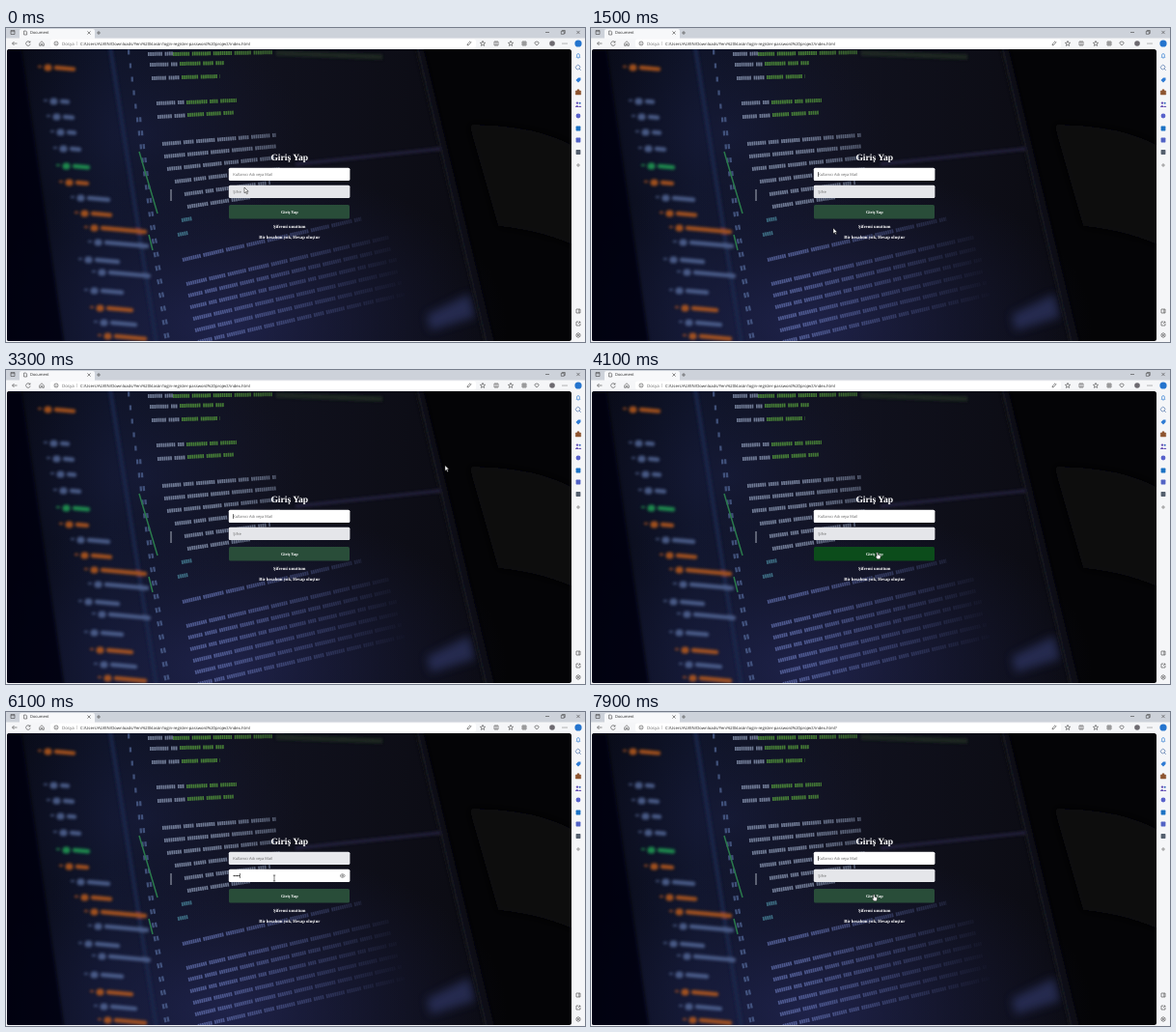
An HTML page that plays this animation: 600x325 px, repeating every 8000 ms.

```html
<!DOCTYPE html>
<html lang="tr">
<head>
<meta charset="utf-8">
<title>Giriş Yap</title>
<style>
  html, body { margin: 0; width: 100%; height: 100%; overflow: hidden; }
  svg { display: block; width: 100vw; height: 100vh; }
  text { font: 4px "Open Sans", "Noto Sans", sans-serif; text-rendering: geometricPrecision; }
  .serif { font-family: "Liberation Serif", "Noto Serif", serif; font-weight: bold; fill: #fff; text-anchor: middle; }
  .hint { fill: #666; }
  .icon { fill: none; stroke: #444; stroke-width: .6; }
</style>
</head>
<body>
<svg viewBox="0 0 600 325" preserveAspectRatio="none">
  <defs>
    <linearGradient id="screen" x1="0" y1="0" x2="1" y2="0">
      <stop offset="0" stop-color="#080a16"/>
      <stop offset=".22" stop-color="#0f1428"/>
      <stop offset=".5" stop-color="#11121f"/>
      <stop offset="1" stop-color="#0b0b12"/>
    </linearGradient>
    <radialGradient id="glow">
      <stop offset="0" stop-color="#262b60" stop-opacity=".65"/>
      <stop offset="1" stop-color="#1a1e46" stop-opacity="0"/>
    </radialGradient>
    <linearGradient id="fade" x1="0" y1="0" x2="1" y2="0">
      <stop offset=".36" stop-color="#fff"/>
      <stop offset=".7" stop-color="#fff" stop-opacity="0"/>
    </linearGradient>
    <mask id="focus" maskUnits="userSpaceOnUse" x="0" y="0" width="600" height="325">
      <rect width="600" height="325" fill="url(#fade)"/>
    </mask>
    <filter id="soft" x="-10%" y="-10%" width="120%" height="120%"><feGaussianBlur stdDeviation="1.4"/></filter>
    <filter id="wide" x="-30%" y="-30%" width="160%" height="160%"><feGaussianBlur stdDeviation="5"/></filter>
    <filter id="slight" x="-10%" y="-10%" width="120%" height="120%"><feGaussianBlur stdDeviation=".5"/></filter>
    <clipPath id="page"><rect x="1" y="22" width="585" height="302" rx="2.5"/></clipPath>
  </defs>

  <rect width="600" height="325" fill="#f5f6f8"/>
  <rect width="600" height="10.5" fill="#cdd2da"/>
  <path d="M14 11V3q0-2 2-2H90q2 0 2 2V11z" fill="#f7f8fa"/>
  <rect x="46" y="11.5" width="441" height="9" rx="2.5" fill="#fff"/>

  <g clip-path="url(#page)">
    <rect y="22" width="590" height="303" fill="#040406"/>
    <path d="M480 100Q560 100 600 130V230Q560 210 510 205z" fill="#09090c" filter="url(#wide)"/>
    <path d="M0 22H424L496 325H0z" fill="url(#screen)"/>
    <ellipse cx="230" cy="310" rx="290" ry="170" fill="url(#glow)"/>
    <ellipse cx="140" cy="110" rx="170" ry="120" fill="url(#glow)" opacity=".4"/>
    <path d="M436 297l44-22 6 24-46 14z" fill="#343c72" opacity=".6" filter="url(#wide)"/>
    <g filter="url(#soft)">
      <path d="M0 22H16L60 325H0z" fill="#05060c" opacity=".85"/>
      <path d="M424 20H432L506 327H496z" fill="#101016"/>
      <path d="M426 20L498 327" stroke="#1c1d29" stroke-width="1.2"/>
      <path d="M108 20L156 327" stroke="#1d2548" stroke-width="4"/>
      <path d="M300 141L450 125" stroke="#2d2a50" stroke-width="3" opacity=".7"/>
      <path d="M280 26L390 30" stroke="#243226" stroke-width="5" opacity=".7"/>
      <g id="tree" fill="none" stroke-linecap="round"></g>
    </g>
    <g id="code" fill="none" filter="url(#slight)" mask="url(#focus)"></g>
  </g>

  <g id="chrome"></g>

  <text class="serif" x="293.8" y="137" style="font-size:9.6px">Giriş Yap</text>
  <rect id="user" x="230.8" y="144.7" width="125.6" height="13.4" rx="1.6"/>
  <rect id="pass" x="230.8" y="162.7" width="125.6" height="13.4" rx="1.6"/>
  <text class="hint" x="235.3" y="153">Kullanıcı Adı veya Mail</text>
  <text class="hint" id="passHint" x="235.3" y="171">Şifre</text>
  <g id="dots" fill="#222"></g>
  <path id="eye" class="icon" d="M346 169.5q2.7-3.5 5.4 0q-2.7 3.5-5.4 0zM348 169.5a.7.7 0 1 0 1.4 0a.7.7 0 1 0-1.4 0"/>
  <rect id="caret" width=".6" height="5" fill="#222"/>
  <rect id="button" x="231" y="183" width="125" height="14.5" rx="1.5"/>
  <text class="serif" x="293.8" y="191.9" style="font-size:4.4px">Giriş Yap</text>
  <text class="serif" x="293.8" y="207" style="font-size:4.7px">Şifremi unuttum</text>
  <text class="serif" x="293.8" y="217.8" style="font-size:4.7px">Bir hesabım yok, Hesap oluştur</text>

  <g id="mouse" stroke-linejoin="round">
    <path id="arrow" d="M0 0V5.8L1.4 4.6L2.4 6.8L3.4 6.3L2.4 4.2H4.2z" fill="#fff" stroke="#111" stroke-width=".5"/>
    <path id="hand" d="M-.4-.8q.8-1 1.4 0V1.2L3.6 1.9V4L2.8 5.7H0L-1.6 2.9l.5-.5L-.4 2.9z" fill="#fff" stroke="#111" stroke-width=".5"/>
    <path id="beam" d="M-1.2-3H1.2M0-3V3M-1.2 3H1.2" fill="none" stroke="#222" stroke-width=".6"/>
  </g>
</svg>
<script>
const $ = id => document.getElementById(id);
const show = (id, on) => $(id).style.display = on ? '' : 'none';

// Blurred file list: x, y, width, colour
const ORANGE = '#c4601c', GREEN = '#1fa657', SLATE = '#566b9c';
$('tree').innerHTML = [
  [34, 41, 36, ORANGE], [40, 76, 24, SLATE], [43, 92, 26, SLATE], [47, 108, 24, SLATE],
  [50, 125, 26, SLATE], [53, 143, 32, GREEN], [56, 160, 28, ORANGE], [68, 176, 38, SLATE],
  [72, 192, 36, ORANGE], [82, 207, 62, ORANGE], [86, 222, 60, SLATE], [76, 240, 40, SLATE],
  [90, 253, 58, SLATE], [82, 272, 38, SLATE], [88, 290, 42, ORANGE], [92, 305, 42, SLATE], [96, 319, 48, ORANGE]
].map(([x, y, w, c]) => `<g stroke="${c}" opacity=".8">
  <path d="M${x} ${y - 1}h2" stroke-width="2"/><path d="M${x + 9} ${y}h1" stroke-width="7"/>
  <path d="M${x + 18} ${y}l${w - 18} ${(w - 18) * .09}" stroke-width="4.4"/></g>`).join('');

// Soft word-like bars: x, y, length, colour
const PALE = '#9aa8c4', LEAF = '#5fae3f', TEAL = '#4f93a8', DIM = '#6877b5';
const lines = [
  [147, 27, 26, PALE], [173, 27, 105, LEAF], [149, 38, 29, PALE], [180, 37, 46, LEAF], [151, 52, 29, PALE],
  [182, 51, 40, LEAF], [156, 78, 29, PALE], [187, 77, 52, LEAF], [157, 92, 29, PALE], [188, 90, 48, LEAF],
  [162, 120, 118, PALE], [164, 133, 118, PALE], [167, 146, 112, PALE], [175, 159, 110, PALE],
  [185, 172, 90, PALE], [188, 185, 66, PALE], [182, 199, 11, TEAL], [178, 214, 11, TEAL],
  [183, 240, 190, DIM], [187, 265, 215, DIM], [189, 277, 215, DIM], [191, 289, 220, DIM],
  [194, 301, 220, DIM], [196, 313, 220, DIM], [199, 325, 220, DIM]
];
const word = n => '1.7 .5 '.repeat(n - 1) + '1.7 2.7 ';
const bar = (x, y, w, c, dash, weight) =>
  `<path d="M${x} ${y}h${w}" stroke="${c}" stroke-width="${weight}" stroke-dasharray="${dash}"
    transform="rotate(${-1 - 12 * Math.min(1, Math.max(0, (y - 26) / 215)) ** 1.5} ${x} ${y})" opacity=".68"/>`;
$('code').innerHTML =
  lines.map(([x, y, w, c], i) => bar(x, y, w, c, word(7 + i % 4) + word(4 + i * 5 % 7) + word(9), 4)).join('') +
  Array.from({length: 22}, (_, i) => bar(126 + i * 1.8, 25 + i * 14, i < 5 ? 2.6 : 5.4, SLATE, '2.3 .8', 5)).join('') +
  `<path d="M171 167v12" stroke="#ccd3df" stroke-width=".8"/>
   <path d="M138 128l19 64M148 214l4 16" stroke="#2a7a4c" stroke-width="1.5"/>`;

// Browser frame
const icon = (x, y, d, color = '#444') => `<path class="icon" style="stroke:${color}" transform="translate(${x} ${y})" d="${d}"/>`;
const blob = (x, y, color, r = 2.4) => `<circle cx="${x}" cy="${y}" r="${r}" fill="${color}"/>`;
const block = (x, y, color) => `<rect x="${x - 2.4}" y="${y - 2.4}" width="4.8" height="4.8" rx=".6" fill="${color}"/>`;
const cross = 'M-1.6-1.6l3.2 3.2M1.6-1.6l-3.2 3.2', plus = 'M-2 0h4M0-2v4';
const box = 'M-2-2h4v4h-4z', lens = 'M1 1a2 2 0 1 0-2.8-2.8a2 2 0 1 0 2.8 2.8l1.8 1.8';
const star = 'M0-2.6L.8-.8L2.6-.7L1.2.6L1.6 2.4L0 1.4L-1.6 2.4L-1.2.6L-2.6-.7L-.8-.8z';
$('chrome').innerHTML = [
  icon(7, 4.5, box + 'M-2-.8h4'), icon(20, 5, 'M-1.4-2H.6l1 1V2h-3z'),
  '<text x="25" y="6.4" fill="#222">Document</text>',
  icon(86, 5, cross), icon(96, 5, plus),
  icon(561, 4.5, 'M-2 0h4'), icon(577, 4.5, 'M-1.7-1.2h3v3h-3zM-.7-1.2v-.8h3v3h-1'), icon(593, 4.5, cross),
  icon(9, 16, 'M2.5 0h-5l2-2m-2 2l2 2'), icon(23, 16, 'M1.8-1.3A2.3 2.3 0 1 0 2.2.5M2-2.5v1.5H.5'),
  icon(37, 16, 'M-2.3 0L0-2.3L2.3 0V2.3H.7V.6H-.7V2.3H-2.3z'),
  icon(52, 16, 'M2 0a2 2 0 1 0-4 0a2 2 0 1 0 4 0M0-.4v1.4'),
  '<text x="58" y="17.5" fill="#666" style="font-size:4.4px">Dosya</text>', icon(73.5, 16, 'M0-2v4', '#bbb'),
  '<text id="url" x="77" y="17.5" fill="#222" style="font-size:4.22px"></text>',
  icon(480, 16, 'M-2 2l.6-1.8L1-2.2l1 1L-.3 1.4z'), icon(494, 16, star),
  icon(508, 16, box + 'M0-2v4'), icon(523, 16, star), icon(537, 16, box + plus),
  icon(550, 16, 'M-2.2 0q0-2 2.2-2t2.2 2l-2.2 2z'), blob(566, 16, '#6d6a70', 2.8),
  ...[577, 579, 581].map(x => blob(x, 16, '#444', .5)),
  blob(593, 16, '#2474ce', 3.6),
  icon(593, 29, 'M-2 1.3l.6-1V-1q0-1.4 1.4-1.4T1.4-1V.3l.6 1zM-.6 2.2h1.2', '#2474ce'),
  icon(593, 41, lens, '#345e9c'),
  '<path d="M590.5 54l2.5-2.5h2.5v2.5l-2.5 2.5z" fill="#2e7bd4"/>',
  '<path d="M590.3 65h5.4v4h-5.4zM592 65v-1.2h2V65" fill="#8e5530" stroke="#8e5530" stroke-width=".5"/>',
  blob(592, 77.6, '#6550b5', 1.2), blob(594.7, 77.8, '#3869be', 1), '<path d="M589.8 82q2-4 4 0zM593.4 82q1.5-3 3 0z" fill="#6550b5"/>',
  blob(593, 91, '#5862cb'), block(593, 104, '#1b72c4'), block(593, 116, '#5263c5'), block(593, 128.5, '#55606e'),
  icon(593, 142, plus, '#666'),
  icon(593, 293, box + 'M.8-2v4'), icon(593, 306, 'M0-2h-2v4h4V0M0 0l2-2M.5-2H2v1.5'),
  icon(593, 318, 'M0-2.4L2-1.2V1.2L0 2.4L-2 1.2V-1.2zM-.8 0a.8.8 0 1 0 1.6 0a.8.8 0 1 0-1.6 0')
].join('');

// Mouse path: time, x, y
const LOOP = 8000, CLICK = 5000, RELOAD = 7700, TYPE = 5600, KEYS = 6;
const path = [
  [0, 247, 165], [400, 248, 170], [1300, 251, 207], [1700, 251, 207], [2500, 541, 49],
  [2900, 541, 49], [3900, 296.5, 190], [4300, 296.5, 190], [4900, 278, 172], [6300, 278, 172],
  [6700, 288.5, 183.5], [6900, 288.5, 184], [7300, 293, 190], [LOOP, 293, 190]
];
const URL_TEXT = 'C:/Users/ALVEN/Downloads/Yeni%20klasör/login-register-password%20project/index.html';

function mouseAt(t) {
  const i = path.findIndex(p => p[0] > t);
  const [t0, x0, y0] = path[i - 1], [t1, x1, y1] = path[i];
  const k = (t - t0) / (t1 - t0), e = k * k * (3 - 2 * k);
  return [x0 + (x1 - x0) * e, y0 + (y1 - y0) * e];
}

function draw(now) {
  const t = Math.floor(now % LOOP / 100) * 100;
  const [x, y] = mouseAt(t);
  const inside = (top, bottom) => x > 231 && x < 356 && y >= top && y < bottom;
  const overButton = inside(183, 197.5);
  const overInput = t > 4000 && (inside(145, 158) || inside(163, 176));
  const onPass = t >= CLICK && t < RELOAD;
  const typed = onPass ? Math.max(0, Math.min(KEYS, Math.floor((t - TYPE) / 140) + 1)) : 0;

  $('mouse').setAttribute('transform', `translate(${x} ${y})`);
  show('hand', overButton);
  show('beam', overInput);
  show('arrow', !overButton && !overInput);
  $('button').setAttribute('fill', overButton && t < RELOAD ? '#0c4c1b' : '#294d39');
  $('user').setAttribute('fill', onPass ? '#e8e9ed' : '#fff');
  $('pass').setAttribute('fill', onPass ? '#fff' : '#e5e6ea');

  show('passHint', !typed);
  show('eye', typed);
  $('dots').innerHTML = Array.from({length: typed}, (_, i) => blob(236.2 + i * 1.7, 169.5, '#222', .7)).join('');
  const blinkStart = t >= RELOAD ? RELOAD : typed ? Math.min(t, TYPE + KEYS * 140) : onPass ? CLICK - 300 : 100;
  show('caret', (t - blinkStart + 1060) % 1060 < 530);
  $('caret').setAttribute('x', 235 + typed * 1.75);
  $('caret').setAttribute('y', onPass ? 167 : 149);
  $('url').textContent = URL_TEXT + (t >= RELOAD ? '?' : '');
}

const start = performance.now();
function tick() {
  draw(performance.now() - start);
  requestAnimationFrame(tick);
}
tick();
</script>
</body>
</html>
```
